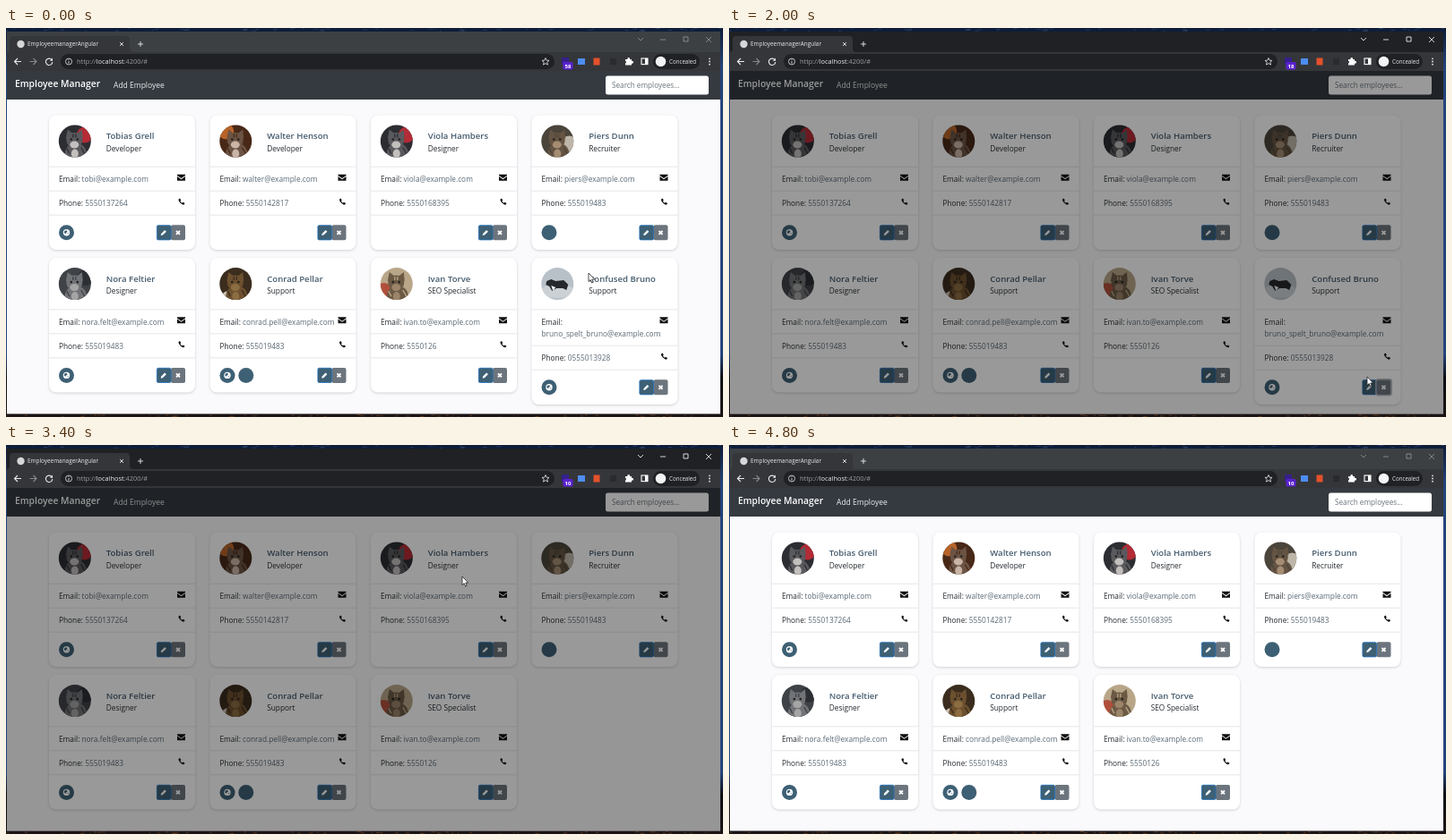
An HTML page for the animation above (5 s loop, 800 by 435 pixels).

```html
<!DOCTYPE html>
<html lang="en">
<head>
<meta charset="utf-8">
<title>Employee Manager</title>
<style>
  html, body { margin: 0; width: 100%; height: 100%; overflow: hidden; background: #111827; }
  svg { display: block; width: 800px; height: 435px; font: 8.3px "Open Sans", "Noto Sans", sans-serif; }
  .name { font-size: 9.6px; font-weight: 600; fill: #455b6d; }
  .label { fill: #24292e; }
  .value { fill: #5a6975; }
</style>
</head>
<body>
<svg id="stage" viewBox="0 0 800 435" xmlns="http://www.w3.org/2000/svg"></svg>
<script>
const LOOP = 5000, STEP = 200;

const rect = (x, y, w, h, fill, extra = '') =>
  `<rect x="${x}" y="${y}" width="${w}" height="${h}" fill="${fill}" ${extra}/>`;
const circle = (x, y, r, fill, extra = '') =>
  `<circle cx="${x}" cy="${y}" r="${r}" fill="${fill}" ${extra}/>`;
const ellipse = (x, y, rx, ry, fill) =>
  `<ellipse cx="${x}" cy="${y}" rx="${rx}" ry="${ry}" fill="${fill}"/>`;
const path = (d, fill, extra = '') => `<path d="${d}" fill="${fill}" ${extra}/>`;
const line = (d, stroke, width = 1, extra = '') =>
  path(d, 'none', `stroke="${stroke}" stroke-width="${width}" ${extra}`);
const text = (x, y, content, extra = '') => `<text x="${x}" y="${y}" ${extra}>${content}</text>`;
const group = (x, y, content, extra = '') =>
  `<g transform="translate(${x} ${y})" ${extra}>${content}</g>`;

// Avatar tones: backdrop, body, face, accent and the accent's place
const TABBY_RED = ['#2c2d32', '#5a595d', '#c3bfbd', '#b32b35', 11, -7];
const employees = [
  { name: 'Tobias Grell', role: 'Developer', email: 'tobi@example.com', phone: '5550137264', links: ['web'], tones: TABBY_RED },
  { name: 'Walter Henson', role: 'Developer', email: 'walter@example.com', phone: '5550142817', links: [], tones: ['#482817', '#6c5445', '#c9b5a6', '#b7632a', -11, -11] },
  { name: 'Viola Hambers', role: 'Designer', email: 'viola@example.com', phone: '5550168395', links: [], tones: TABBY_RED },
  { name: 'Piers Dunn', role: 'Recruiter', email: 'piers@example.com', phone: '555019483', links: ['social'], tones: ['#4a443b', '#655443', '#a58d73', '#bdb6a8', 13, 3] },
  { name: 'Nora Feltier', role: 'Designer', email: 'nora.felt@example.com', phone: '555019483', links: ['web'], tones: ['#3f4247', '#717376', '#a5a5a5', '#2c2f34', 12, -7] },
  { name: 'Conrad Pellar', role: 'Support', email: 'conrad.pell@example.com', phone: '555019483', links: ['web', 'social'], tones: ['#3b2d1e', '#6d502f', '#8c6d42', '#d1c8bb', -8, 17] },
  { name: 'Ivan Torve', role: 'SEO Specialist', email: 'ivan.to@example.com', phone: '5550126', links: [], tones: ['#b9a688', '#6c5a45', '#9b8469', '#b0503c', -14, 8] },
  { name: 'Confused Bruno', role: 'Support', email: 'bruno_spelt_bruno@example.com', phone: '0555013928', links: ['web'], tones: ['#b9c1c8'], wrap: true },
];

const MAIL = path('M-4.5-3.5H4.5V-2.3L0 .9-4.5-2.3ZM-4.5-1.2 0 2 4.5-1.2V3.5H-4.5Z', '#111');
const PHONE = path('M-3.4-2.6-2-3.6-.7-1.4-1.6-.5Q-.9.9.5 1.6L1.4.7 3.6 2 2.6 3.4Q1.4 4-1 2-4-.9-3.4-2.6Z', '#111');
const PENCIL = path('M-3.3 3.3-2.8 1.1 1.1-2.9 2.9-1.1-1.1 2.8Z', '#fff');
const CROSS = line('M-2-2 2 2M2-2-2 2', '#fff', 1.9);
const GLOBE = circle(0, 0, 3.7, '#fff') + path('M-2.3-1.8.2-2.6 1-.8-.4.2-1.3 1.4-2.6.1ZM1.2.6 2.4.3 1.5 2.2Z', '#3e6074');

function avatar([back, body, face, accent, accentX, accentY]) {
  const art = accent
    ? circle(accentX, accentY, 9, accent) +
      ellipse(1, 14, 12, 12, body) +
      path('M-10-3-8-13-3-9 3-9 8-13 9-3Z', body) +
      ellipse(-.5, -1, 9, 8.5, body) +
      ellipse(-.5, 4, 5, 4, face) + ellipse(0, 14, 4, 5, face) +
      circle(-4, -2, 1.3, '#22211f') + circle(3, -2, 1.3, '#22211f') +
      line('M-2-8V-4M1-8V-4M7 7 11 14M-9 8-6 14', back, 1.3)
    : ellipse(0, 8, 18, 8, '#cbd1d5') +
      path('M-12-3-7-5-2-3 7-4 12 1 10 7 6 5-1 5-6 8-9 3-13 1Z', '#25282c') +
      path('M-7 2-2 4-5 8Z', '#eef0f1');
  return circle(0, 0, 18, back) + `<g clip-path="url(#round)"><g filter="url(#photo)">${art}</g></g>`;
}

function card(person, index) {
  const extra = person.wrap ? 13.4 : 0;
  const rows = [57.7, 84.7 + extra, 111.7 + extra];
  const foot = 131.3 + extra;
  const links = person.links.map((kind, i) =>
    group(19.5 + i * 20.8, foot, circle(0, 0, 8.5, '#3e6074') + (kind === 'web' ? GLOBE : '')));
  const email = person.wrap
    ? text(11, 74.5, 'Email:', 'class="label"') + text(11, 87.7, person.email, 'class="value"')
    : text(11, 74.5, `Email: <tspan class="value">${person.email}</tspan>`, 'class="label"');
  const height = 150.5 + extra;
  return group(48 + (index % 4) * 179.5, 97.5 + Math.floor(index / 4) * 159.6,
    rect(0, 1, 163, height, '#000', 'rx="8" opacity=".16" filter="url(#soft)"') +
    rect(0, 0, 163, height, '#fff', 'rx="8"') +
    group(28.8, 29, avatar(person.tones)) +
    text(63.7, 26.5, person.name, 'class="name"') +
    text(63.7, 40, person.role, 'class="label"') +
    line(rows.map(y => `M0 ${y}H163`).join(''), '#dfe1e5', .8) +
    email + group(147.5, 69.7, MAIL) +
    text(11, 101.5 + extra, `Phone: <tspan class="value">${person.phone}</tspan>`, 'class="label"') +
    group(148, 96.6 + extra, PHONE) + links.join('') +
    rect(136, foot - 8.5, 16, 17, '#6c757d', 'rx="2"') +
    rect(120.4, foot - 8.1, 15.6, 16.2, '#3e6074', 'rx="1.5" stroke="#1d6fbd" stroke-width=".8"') +
    group(128, foot, PENCIL) + group(144, foot, CROSS) +
    (person.wrap ? rect(135.4, foot - 9, 17.4, 18, 'none', 'id="focus" rx="2.5" stroke="#b4bac0" stroke-width="1.4"') : ''),
    `id="card${index}"`);
}

function desktop() {
  let seed = 7;
  const random = () => (seed = seed * 16807 % 2147483647) / 2147483647;
  let specks = '';
  for (let i = 0; i < 60; i++) {
    specks += rect(random() * 800, random() * 3, 1 + random() * 5, .8, '#426088', 'opacity=".5"');
    specks += rect(random() * 800, 432 + random() * 2, 1 + random() * 4, 1, '#a7602c', 'opacity=".4"');
  }
  return rect(0, 0, 800, 435, 'url(#night)') + specks;
}

function browser() {
  const white = '#e8eaed', grey = '#9aa0a6';
  return rect(1, 4, 796, 44, '#202124', 'id="strip"') +
    path('M1 27Q4 27 4 23V13Q4 9 8 9H134Q138 9 138 13V23Q138 27 142 27Z', '#35363a') +
    rect(1, 27, 796, 21, '#35363a') +
    circle(16.5, 18, 4.2, '#d6d7d9') +
    text(24, 20.4, 'EmployeemanagerAngular', `font-size="6.4" fill="${white}"`) +
    line('M127 16 131 20M131 16 127 20M150 15V21M147 18H153', white, .9) +
    line('M17 37.5H9.5M13 34 9.5 37.5 13 41', white, 1.1) +
    line('M26.5 37.5H34M30.5 34 34 37.5 30.5 41', '#85888d', 1.1) +
    line('M51 35.5A3.7 3.7 0 1 0 51.8 38', white, 1.1) + path('M52 33.5V36.7H48.8Z', white) +
    rect(61, 29, 551, 17, '#202124', 'rx="8.5"') +
    circle(70, 37.5, 3.5, 'none', `stroke="${white}" stroke-width=".8"`) + line('M70 37V39.6M70 35.2V36', white, .9) +
    text(79, 40, `http://<tspan fill="${white}">localhost</tspan>:4200/#`, `font-size="7.4" fill="${grey}"`) +
    path('M602 33.5 603.2 36.2 606 36.4 603.8 38.3 604.5 41.1 602 39.6 599.5 41.1 600.2 38.3 598 36.4 600.8 36.2Z', 'none', `stroke="${white}" stroke-width=".8"`) +
    rect(620, 33, 8, 8, '#35208c') + rect(621.5, 38, 11, 8.5, '#5a22cf', 'rx="1.5"') +
    text(627, 44.5, '', 'id="badge" font-size="6" font-weight="700" text-anchor="middle" fill="#fff"') +
    rect(638, 34, 8, 7, '#4d8df0') + rect(655.5, 33.5, 7, 8, '#e4512b') + rect(674, 34, 7, 7, '#2a2b2e') +
    path('M691 35H693.5A1.4 1.4 0 1 1 696 35H698V37A1.4 1.4 0 1 1 698 39.5V41.5H691V39.5A1.4 1.4 0 0 0 691 36.8Z', '#fff') +
    rect(709, 34, 7, 6.6, 'none', 'stroke="#fff" stroke-width="1.1"') + rect(713, 34, 3, 6.6, '#fff') +
    rect(722, 29, 52, 17, '#202124', 'rx="8.5"') + circle(730.5, 37.5, 5.8, '#f1f3f4') +
    text(740, 39.8, 'Concealed', `font-size="6.2" fill="${white}"`) +
    [34.3, 37.5, 40.7].map(y => circle(785, y, .9, white)).join('') +
    line('M705 11 708 14 711 11M730 13H736M756 10H761V15H756ZM781 10 787 16M787 10 781 16', white, .9, 'id="controls"');
}

const page = rect(1, 80, 796, 351.5, '#faf9fb') + rect(1, 48, 796, 32, '#343a40') +
  text(10, 66.3, 'Employee Manager', 'font-size="10.3" font-weight="600" fill="#fff"') +
  text(120, 67, 'Add Employee', 'font-size="8.5" fill="#eceeef"') +
  rect(669, 53.5, 115, 21, '#fff', 'rx="2.5"') +
  text(676, 67.3, 'Search employees...', 'font-size="8.2" fill="#6c757d"') +
  employees.map(card).join('');

const modal = rect(261, 64, 275.5, 110.5, '#fff', 'rx="2.5" stroke="#555" stroke-width=".5"') +
  text(270, 83, 'Delete Employee', 'class="label"') +
  line('M520 78.8 525 83.8M525 78.8 520 83.8', '#555', 1.2) +
  line('M261 95.5H536M270 126.5H527', '#dee2e6', .7) +
  text(270, 114.2, 'Are you sure you want to delete employee Confused Bruno?', 'class="label"') +
  rect(461, 136, 26.5, 20.8, '#6c757d', 'rx="2.5"') + rect(491.5, 136, 27.5, 20.8, '#dc3545', 'rx="2.5"') +
  text(474.2, 149.4, 'No', 'fill="#fff" text-anchor="middle" font-weight="600"') +
  text(505.2, 149.4, 'Yes', 'fill="#fff" text-anchor="middle" font-weight="600"');

const OUTLINE = 'stroke="#222" stroke-width=".8"';
const ARROW = path('M0 0V9.6L2.2 7.6 3.7 11 5.2 10.3 3.8 7H6.8Z', '#fff', OUTLINE);
const HAND = path('M-1 1Q0-.6 1 1V5Q2 4.2 2.8 5.3 3.8 4.7 4.4 5.8 5.6 5.4 5.6 7V9.5L4.5 12.5H-.8L-3.7 8.3Q-4 6.4-2.8 6.7L-1 8Z', '#fff', OUTLINE);

const stage = document.getElementById('stage');
stage.innerHTML = `<defs>
    <linearGradient id="night" x2="0" y2="1"><stop stop-color="#0d1b36"/><stop offset=".1" stop-color="#24447a"/><stop offset=".84" stop-color="#24447a"/><stop offset=".9" stop-color="#0d0d12"/><stop offset="1" stop-color="#1b1414"/></linearGradient>
    <clipPath id="round"><circle r="18"/></clipPath>
    <filter id="soft" x="-10%" y="-10%" width="120%" height="120%"><feGaussianBlur stdDeviation="1.8"/></filter>
    <filter id="photo"><feGaussianBlur stdDeviation=".7"/></filter>
  </defs>` + desktop() + browser() + page +
  rect(1, 48, 796, 383.5, '#000', 'id="backdrop"') +
  `<g id="modal">${modal}</g><g id="cursor"><g id="arrow">${ARROW}</g><g id="hand">${HAND}</g></g>`;

const find = id => document.getElementById(id);
const [badge, strip, controls, focus, lastCard, backdrop, dialog, cursor, arrow, hand] =
  ['badge', 'strip', 'controls', 'focus', 'card7', 'backdrop', 'modal', 'cursor', 'arrow', 'hand'].map(find);
const show = (node, visible) => node.setAttribute('visibility', visible ? 'inherit' : 'hidden');

// Pointer stops: time, x, y
const pointer = [
  [0, 650, 274], [200, 650, 274], [400, 656, 274], [600, 679, 272], [800, 757, 291], [1000, 767, 295],
  [1400, 744, 374], [1600, 732, 398], [1800, 730, 400], [2000, 712, 390], [2400, 545, 192],
  [2600, 490, 149], [2800, 502, 148], [3400, 509, 147], [3600, 509, 147], [4000, 311, 386], [4200, 207, 440],
];
const badges = [[0, 58], [400, 10], [2000, 18], [3400, 10], [3600, 53], [3800, 10]];

function pointerAt(t) {
  const next = pointer.findIndex(stop => stop[0] > t);
  if (next < 0) return pointer[pointer.length - 1].slice(1);
  const [t0, x0, y0] = pointer[next - 1], [t1, x1, y1] = pointer[next];
  const k = (t - t0) / (t1 - t0);
  return [x0 + (x1 - x0) * k, y0 + (y1 - y0) * k];
}

function dimAt(t) {
  if (t < 2000 || t >= 3600) return 0;
  return t < 2200 || t >= 3400 ? .4 : .5;
}

function render(now) {
  const t = Math.floor((now % LOOP) / STEP) * STEP;
  const [x, y] = pointerAt(t);
  const pointing = (t >= 1600 && t < 2000) || (t >= 2600 && t < 3400);
  cursor.setAttribute('transform', `translate(${x} ${y})`);
  show(cursor, t < 4200);
  show(arrow, !pointing);
  show(hand, pointing);

  const opened = t >= 2200 && t < 3400 ? Math.min(1, (t - 2000) / 300) : 0;
  const eased = 1 - (1 - opened) ** 2;
  dialog.setAttribute('opacity', opened);
  dialog.setAttribute('transform', `translate(0 ${-28 * (1 - eased)})`);
  backdrop.setAttribute('opacity', dimAt(t));

  show(lastCard, t < 3400);
  show(focus, t >= 1800 && t < 2400);

  const windowActive = t >= 400 && t < 4800;
  strip.setAttribute('fill', windowActive ? '#202124' : '#3c4043');
  controls.setAttribute('opacity', windowActive ? 1 : .45);
  badge.textContent = badges.filter(b => b[0] <= t).pop()[1];
}

const start = performance.now();
function tick() {
  render(performance.now() - start);
  requestAnimationFrame(tick);
}
tick();
</script>
</body>
</html>
```
